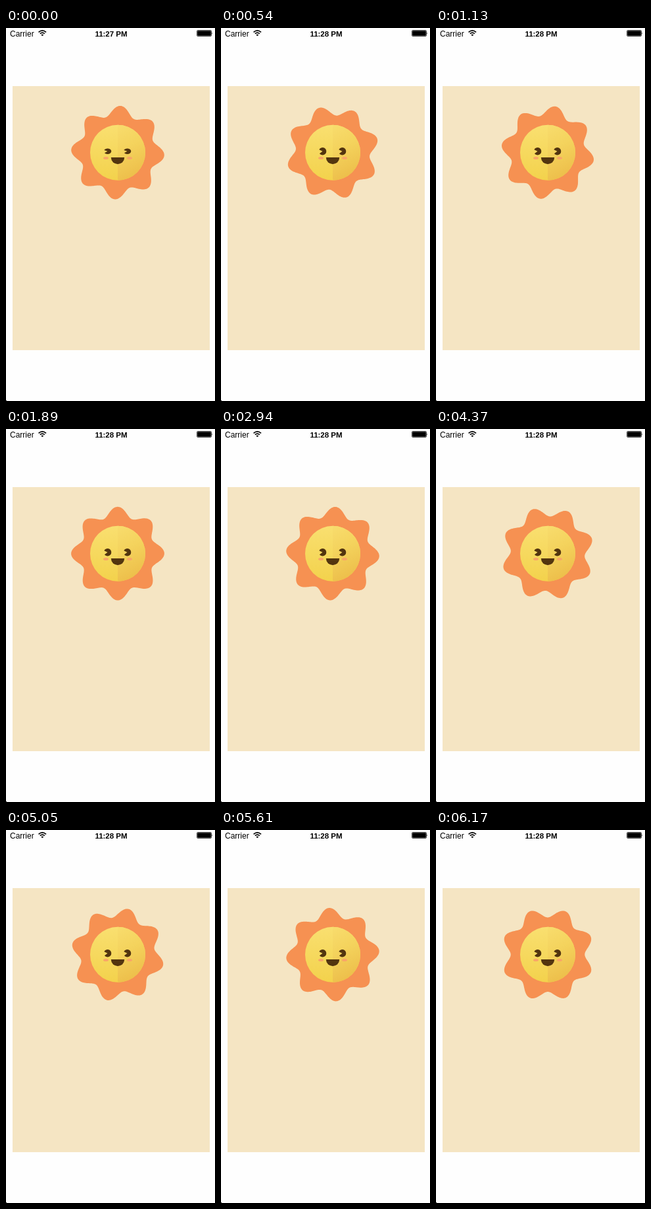
These frames come from a looping animation (318x565 px, 6.19 s). An HTML page:

```html
<!DOCTYPE html>
<html lang="en">
<head>
<meta charset="utf-8">
<title>Smiling sun</title>
<style>
  html, body { margin: 0; width: 100%; height: 100%; overflow: hidden; background: #fefefe; }
  svg { display: block; width: 318px; height: 565px; }
  text { font-family: "Liberation Sans", Arial, sans-serif; }
</style>
</head>
<body>
<svg viewBox="0 0 318 565">
  <defs>
    <linearGradient id="light" x1="0" y1="0" x2="0" y2="1">
      <stop offset="0" stop-color="#f9df70"/>
      <stop offset="1" stop-color="#f3d24c"/>
    </linearGradient>
    <linearGradient id="shade" x1="0" y1="0" x2=".25" y2="1">
      <stop offset="0" stop-color="#f8dc6d"/>
      <stop offset=".45" stop-color="#f4d35d"/>
      <stop offset="1" stop-color="#edbf4b"/>
    </linearGradient>
    <path id="eye" d="M0 0L-5.2 -2.6A5.8 5.8 0 1 1 -4.6 3.5Z"/>
  </defs>

  <!-- Status bar -->
  <text x="6" y="12.5" font-size="12">Carrier</text>
  <g fill="none" stroke="#000" stroke-width="1.7">
    <path d="M49.6 6.4Q55.3 1.4 61 6.4M51.8 8.7Q55.3 5.6 58.8 8.7"/>
    <path d="M55.3 12.3L53.3 10.3Q55.3 8.6 57.3 10.3Z" fill="#000" stroke="none"/>
  </g>
  <text id="clock" x="160" y="12.5" font-size="11.5" font-weight="bold" text-anchor="middle">11:27 PM</text>
  <rect x="290.5" y="3.5" width="22" height="9" rx="1.3" fill="none" stroke="#000" stroke-width=".7"/>
  <rect x="291.2" y="4.2" width="20.6" height="7.6" rx=".7"/>
  <path d="M313.3 6.4Q314.8 8 313.3 9.6Z"/>

  <rect x="10" y="88" width="300" height="400" fill="#f5e5c3"/>
  <rect y="564" width="1" height="1"/>

  <!-- Sun -->
  <g transform="translate(170 188.7)">
    <path id="rays" fill="#f69152"/>
    <circle r="42" fill="url(#light)"/>
    <path d="M0 -42A42 42 0 0 1 0 42Z" fill="url(#shade)"/>
    <g fill="#f9a668">
      <ellipse cx="-18" cy="8.3" rx="4" ry="2"/>
      <ellipse cx="18" cy="8.3" rx="4" ry="2"/>
    </g>
    <g fill="#53350f">
      <g id="eyes">
        <use href="#eye" x="-15.5"/>
        <use href="#eye" x="14.5"/>
      </g>
      <path d="M-10.2 7.3H10.2A10.2 10.2 0 0 1 -10.2 7.3Z"/>
    </g>
  </g>
</svg>
<script>
  const $ = id => document.getElementById(id);
  const LOOP = 6190, TURN = 2.7, START = 3.5;
  // Each span holds eleven steps: first and last time in ms
  const spans = [[60, 660], [710, 1310], [1370, 1950], [2010, 2580], [2640, 3230],
    [3290, 3860], [3910, 4480], [4540, 5110], [5160, 5720], [5780, 6337]];

  function wavyCircle(radius, wave, count) {
    const points = [];
    for (let deg = 0; deg < 360; deg++) {
      const a = deg * Math.PI / 180;
      const r = radius + wave * Math.cos(count * a);
      points.push((r * Math.sin(a)).toFixed(2) + " " + (-r * Math.cos(a)).toFixed(2));
    }
    return "M" + points.join("L") + "Z";
  }

  function stepAt(t) {
    const i = spans.findLastIndex(([from]) => t >= from);
    if (i < 0) return 0;
    const [from, to] = spans[i];
    return 11 * i + 1 + Math.min(10, Math.floor((t - from) / (to - from) * 10 + 0.1));
  }

  function draw(now) {
    const t = now % LOOP, step = stepAt(t);
    $("rays").setAttribute("transform", `rotate(${START + TURN * step})`);
    const open = Math.min(1, 0.72 + 0.2 * step);
    $("eyes").setAttribute("transform", `translate(0 -1.9) scale(1 ${open})`);
    $("clock").textContent = t < 360 ? "11:27 PM" : "11:28 PM";
  }

  $("rays").setAttribute("d", wavyCircle(63.6, 7.3, 8));
  const begin = performance.now();
  function tick() {
    draw(performance.now() - begin);
    requestAnimationFrame(tick);
  }
  tick();
</script>
</body>
</html>
```
